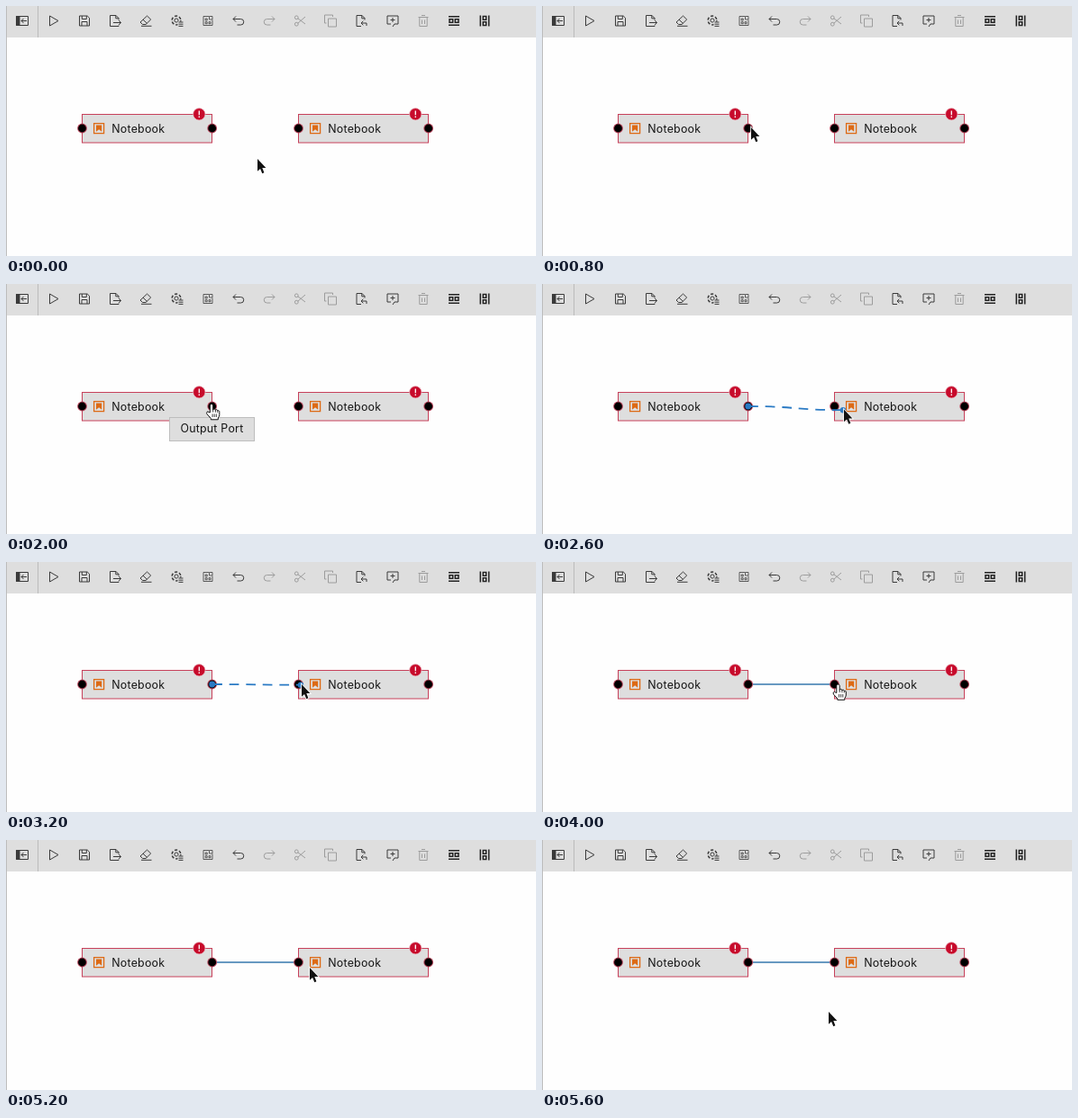
Write an HTML page that moves like this. It is 588 px wide and 278 px high and loops after 6000 ms.

```html
<!DOCTYPE html>
<html lang="en">
<head>
<meta charset="utf-8">
<title>Connecting two nodes</title>
<style>
  html, body { margin: 0; width: 100%; height: 100%; overflow: hidden; background: #fefefe; }
  svg { display: block; width: 100vw; height: 100vh; }
  text { font: 12.4px Inter, "Open Sans", sans-serif; letter-spacing: .22px; fill: #151515; }
  .icon { fill: none; stroke: #3a3a3a; stroke-width: 1; }
  .icon.off { stroke: #9c9c9c; }
  .icon .solid { fill: #3a3a3a; }
  .icon .bold { stroke: #222; stroke-width: 1.5; }
  .icon .fine { stroke-width: .8; }
  .wire { fill: none; stroke: #3477ac; stroke-width: 1.7; }
  .dash { stroke: #2a7ac4; stroke-width: 1.8; stroke-dasharray: 10.8 7.8; }
  .dot { fill: #2a7ac4; }
</style>
</head>
<body>
<svg viewBox="0 0 588 278">
  <defs>
    <g id="port">
      <circle r="5.400" fill="#b5465c"/>
      <circle r="4.400"/>
    </g>
    <g id="node">
      <rect x="84.500" y="120.500" width="144" height="31.500" fill="#dedede" stroke="#c7405a"/>
      <use href="#port" x="84.500" y="136"/>
      <use href="#port" x="228.700" y="136"/>
      <rect x="97.600" y="130.600" width="11" height="11" fill="none" stroke="#dd6a14" stroke-width="1.300"/>
      <path d="M100 132.500H106.200V139.800L103.100 137.300L100 139.800Z" fill="#dd6a14"/>
      <text x="117.300" y="141">Notebook</text>
      <circle cx="214.300" cy="120.300" r="6.700" fill="#c70a2b" stroke="#eccdd3" stroke-width=".700"/>
      <path d="M214.300 116.500V121.300M214.300 122.600V124" stroke="#fff" stroke-width="1.300"/>
    </g>
    <path id="arrow" d="M0 0V13.800L3.100 10.900L5.300 16.200L7.400 15.300L5.300 10.100H9.400Z"
      fill="#111" stroke="#fff" stroke-width="1.600" paint-order="stroke"/>
    <g id="hand" fill="#fff" stroke="#111" stroke-linejoin="round">
      <path d="M-1.700 9.500V1.500Q-1.500 0 0 0T1.700 1.500V6.500Q2 5.200 3.200 5.400T4.400 7Q4.800 5.900 5.800 6.200T6.800 7.700
               Q7.300 6.900 8.100 7.300T8.800 9V12Q8.600 14 7.300 15.500V17.300H-.700V16L-4.800 11.400
               Q-6 9.800 -5 8.800T-3 9Z"/>
      <path d="M1.700 6.500V9M4.400 7V9.200M6.800 7.700V9.500M1.100 11V14.500M3.200 11V14.500M5.300 11V14.500" stroke-width=".800"/>
    </g>
  </defs>
  <rect width="588" height="278" fill="#fefefe"/>
  <rect width="588" height="35" fill="#dedede"/>
  <path d="M.5 0V278M35.500 0V35" stroke="#bcbcbc"/>
  <g id="toolbar"></g>
  <path id="link" class="wire" d="M229 136H324"/>
  <use href="#node"/>
  <use href="#node" x="240"/>
  <g id="drag">
    <path id="dragWire" class="wire dash"/>
    <circle class="dot" cx="228.700" cy="136" r="3.400"/>
    <circle id="dragEnd" class="dot" r="3.200"/>
  </g>
  <g id="tip">
    <rect x=".5" y="148.500" width="94" height="26" fill="#dedede" stroke="#bdbdbd"/>
    <text id="tipText" y="165"></text>
  </g>
  <use id="cursor"/>
</svg>
<script>
const $ = id => document.getElementById(id);
const show = (el, on) => el.setAttribute('visibility', on ? 'visible' : 'hidden');

// Icons are drawn around their own centre: [x, markup, disabled]
const path = (d, cls = '') => `<path class="${cls}" d="${d}"/>`;
const undo = path('M-3 -5L-6 -2L-3 1M-6 -2H2.500A3.200 3.200 0 0 1 2.500 4.500H-1.500');
const spread = path('M-6 -4.700H6M-6 4.700H6', 'bold')
  + path('M-5 -1.700H-1.300V1.700H-5ZM1.300 -1.700H5V1.700H1.300Z', 'bold');
const icons = [
  [18, path('M-6.500 -5H6.500V5H-6.500Z') + path('M-6.500 -5H-3V5H-6.500Z', 'solid')
    + path('M5 0H-1M1.500 -2.500L-1 0L1.500 2.500')],
  [53, path('M-4.500 -5.500L5 0L-4.500 5.500Z')],
  [87, path('M-5.500 -5.500H3.200L5.500 -3.200V5.500H-5.500ZM-2.700 -5.500V-2H2.300V-5.500M-3 5.500V1H3V5.500')],
  [121, path('M4 -1V-3L1 -6H-5.500V6H4V5M.800 -6V-2.700H4M-2 2H6.500M4.200 -.500L6.500 2L4.200 4.500')],
  [155, path('M-5 5.800H6.500M-3.500 4L-6 1.500L1.500 -5.500L5.700 -1.500L0 4ZM-3 -1.300L1.500 2.800')],
  [190, '<circle cx="-1" cy="-.500" r="2.100"/>'
    + '<circle cx="-1" cy="-.500" r="4.900" stroke-width="1.500" stroke-dasharray="3.200 1.930"/>'
    + '<path d="M.500 .800H7V7H.500Z" fill="#dedede" stroke="none"/>'
    + path('M1.500 1.500H6.500M1.500 3.700H6.500M1.500 5.900H6.500')],
  [224, path('M1 -5H-5V5H5V-1M-2.800 -2.500H-.800V-.500H-2.800ZM-2.800 1.200H-.800V3.200H-2.800Z'
    + 'M1 1.200H3V3.200H1ZM1.500 -5H5V-1.500H1.500Z', 'fine')],
  [258, undo],
  [292, `<g transform="scale(-1 1)">${undo}</g>`, true],
  [326, '<circle cx="-3.700" cy="-3.700" r="1.900"/><circle cx="-3.700" cy="3.700" r="1.900"/>'
    + path('M-2.200 -2.700L6 3.500M-2.200 2.700L6 -4.500'), true],
  [360, path('M-2.500 -2.500H6.500V6.500H-2.500ZM-4.500 2.500H-6.500V-6.500H2.500V-4.500'), true],
  [394, path('M4 -1V-3L1 -6H-5V6H0M.800 -6V-2.700H4M6 5.500V2.500H0M2.300 .200L0 2.500L2.300 4.800')],
  [429, path('M-2 3.500H-6V-5.500H6V3.500H2L0 6.500M0 -3.500V1.500M-2.500 -1H2.500')],
  [463, path('M-5.500 -4H5.500M-4.200 -4V6H4.200V-4M-2 -6H2M-1.500 -1V3.500M1.500 -1V3.500'), true],
  [497, spread],
  [531, `<g transform="rotate(90)">${spread}</g>`],
];
$('toolbar').innerHTML = icons.map(([x, art, off]) =>
  `<g class="icon${off ? ' off' : ''}" transform="translate(${x} 16.500)">${art}</g>`).join('');

// The pointer is sampled five times a second: [from ms, x, y, shape]
const pointer = [
  [0, 279, 170, 'arrow'], [400, 270, 164, 'arrow'], [600, 255, 149, 'arrow'],
  [800, 232, 135, 'arrow'], [1000, 229, 134, 'hand'], [1200, 228, 133.5, 'hand'],
  [2200, 230, 136, 'arrow'], [2400, 291, 137, 'arrow'], [2600, 335, 139.5, 'arrow'],
  [2800, 336.5, 139.5, 'arrow'], [3000, 330, 137, 'arrow'], [3200, 328, 136, 'arrow'],
  [4000, 328.5, 136, 'hand'], [5200, 337, 142, 'arrow'], [5400, 317, 190, 'arrow'],
  [5600, 318, 191, 'arrow'],
];
const tips = [
  { from: 1800, to: 2200, x: 181, textX: 12.5, label: 'Output Port' },
  { from: 4800, to: 5200, x: 277, textX: 17.5, label: 'Input Port' },
];

function draw(t) {
  const [, x, y, shape] = pointer.findLast(p => p[0] <= t);
  $('cursor').setAttribute('href', '#' + shape);
  $('cursor').setAttribute('transform', `translate(${x} ${y})`);

  show($('drag'), t >= 2200 && t < 4000);
  show($('link'), t >= 4000);
  const endX = x - 1, endY = y + .7, midX = (229 + endX) / 2;
  $('dragWire').setAttribute('d', `M229 136C${midX} 136 ${midX} ${endY} ${endX} ${endY}`);
  $('dragEnd').setAttribute('cx', endX);
  $('dragEnd').setAttribute('cy', endY);

  const tip = tips.find(p => t >= p.from && t < p.to);
  show($('tip'), tip);
  if (tip) {
    $('tip').setAttribute('transform', `translate(${tip.x} 0)`);
    $('tip').setAttribute('opacity', t < tip.from + 200 ? .45 : 1);
    $('tipText').setAttribute('x', tip.textX);
    $('tipText').textContent = tip.label;
  }
}

const start = performance.now();
function frame() {
  draw((performance.now() - start) % 6000);
  requestAnimationFrame(frame);
}
frame();
</script>
</body>
</html>
```
